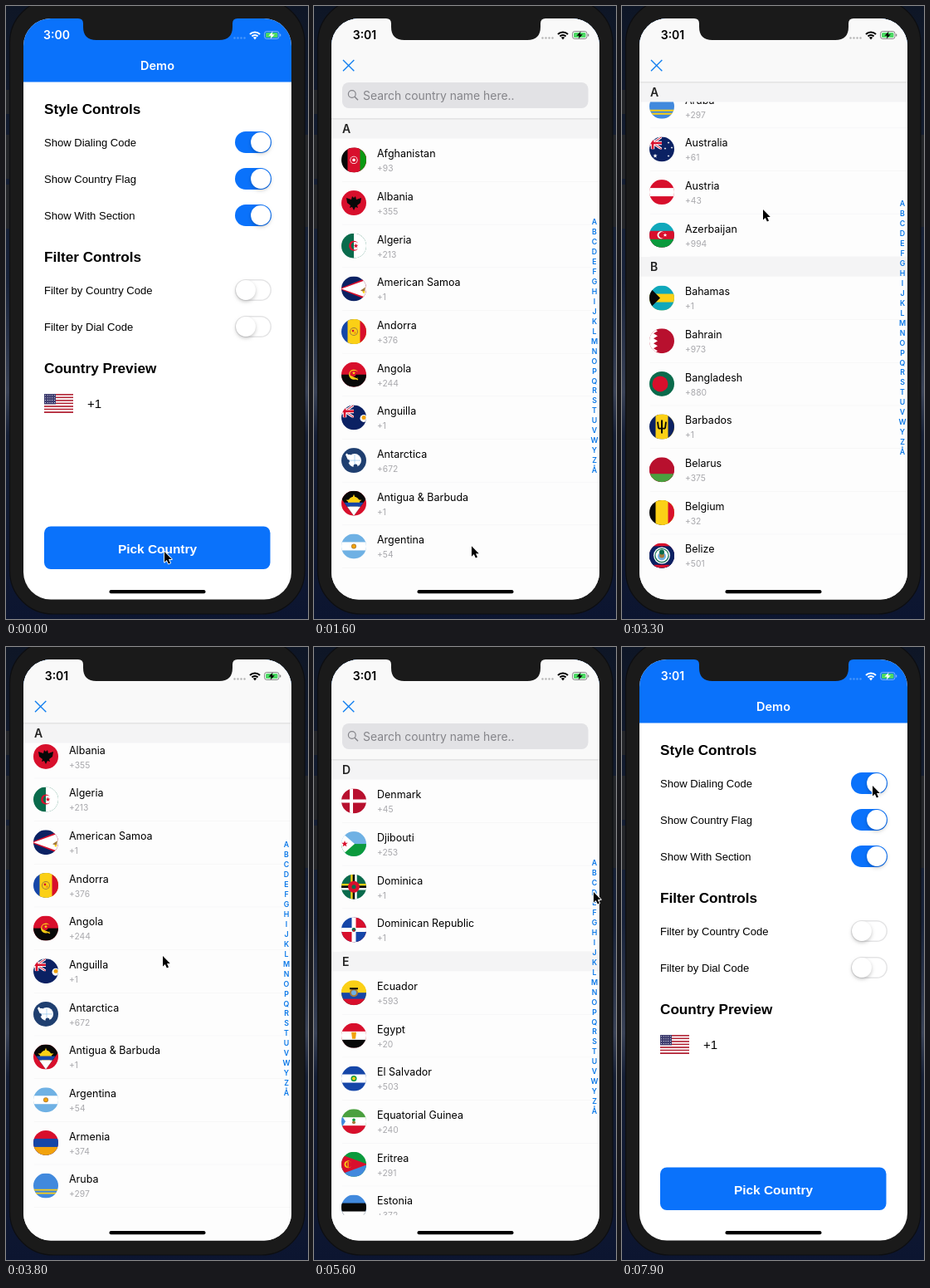
Write an HTML page with a canvas that moves like this. It is 364 by 738 pixels and loops after 8000 ms.

```html
<!DOCTYPE html>
<html lang="en">
<head>
<meta charset="utf-8">
<title>Country picker demo</title>
<style>
html, body { margin: 0; width: 100%; height: 100%; overflow: hidden; background: #111a2c; }
canvas { display: block; width: 364px; height: 738px; }
</style>
</head>
<body>
<canvas id="stage"></canvas>
<script>
const LOOP = 8000, BLUE = '#0a72fb', BEZEL = '#1a1a1a';
const UI = 'Inter, Roboto, sans-serif', HELV = '"Liberation Sans", Arial, sans-serif';
const canvas = document.getElementById('stage'), g = canvas.getContext('2d');
const dpr = window.devicePixelRatio || 1;
canvas.width = 364 * dpr;
canvas.height = 738 * dpr;

// name | dial code | flag: h/v stripes, c circle, p polygon, l line, m crescent, s star, j union jack
const COLORS = { k: '#080808', r: '#d80f2c', g: '#0a9a3c', w: '#fff', b: '#0b2163', y: '#fbd016', u: '#1546a8',
  s: '#6fb1e4', o: '#f2a20c', a: '#10a8bb', e: '#0a6b4c', n: '#a5793a', i: '#4189dd', d: '#1f3f70',
  t: '#b8102e', l: '#4aa03f', f: '#0a9a12' };
const COUNTRIES = `Afghanistan|93|vkrrf cw0,0,4.6 cr0,0,3.8 cw0,0,1.8
Albania|355|hr pk-9,-6,-3,-4,-2,-8,0,-6,2,-8,3,-4,9,-6,8,0,4,3,5,6,2,5,0,9,-2,5,-5,6,-4,3,-8,0
Algeria|213|vew mr0,0,6 sr2.5,0,3
American Samoa|1|hb pr-18,0,15,-13,15,13 pw-15,0,16,-11,16,11 pn8,2,14,-2,13,4 cy12,4,1.3
Andorra|376|vuyyr cn0,0,5 cy0,0,4 cr-1,-1,1.3 co1.5,1.5,1.5
Angola|244|hrk my0,0,6 cr-1,-1,3.6 ly-4,2,5,6,1.5 sy0,-2,2.2
Anguilla|1|hb j cw12,1,4.5 co12,0,2.5
Antarctica|672|hd cw1,0,8 pw-10,-7,-4,-7,0,2,-6,2 cd2,7,2.5 cd-7,1,2 lw-9,-8,-5,-3,2 ls-6,0,8,0,.5 ls1,-7,1,5,.5
Antigua & Barbuda|1|hr pk-22,-15,22,-15,0,15 sy0,-1,10 cy0,-1,7 pu-11.7,-1,11.7,-1,8,4,-8,4 pw-8,4,8,4,0,15
Argentina|54|hsws cn0,0,3 co0,0,2.3
Armenia|374|hruo
Aruba|297|hi ly-15,5,15,5,1.8 ly-15,9,15,9,1.8
Australia|61|hb j sw-8,8,2.8 sw8,-8,1.5 sw4,-1,1.5 sw12,-2,1.5 sw8,8,1.5
Austria|43|hrwr
Azerbaijan|994|harg mw-1,0,4.5 sw4,0,2.5
Bahamas|1|haya pk-16,-14,-2,0,-16,14
Bahrain|973|ht pw-15,-15,-10,-15,-5,-12,-10,-9,-5,-6,-10,-3,-5,0,-10,3,-5,6,-10,9,-5,12,-10,15,-15,15
Bangladesh|880|he cr-2,0,9.5
Barbados|1|vbyyb lk0,-8,0,8,2 lk-5,-6,-4,2,1.8 lk5,-6,4,2,1.8 lk-4,2,4,2,1.8
Belarus|375|httl
Belgium|32|vkyyr
Belize|501|hrbbbbbbr cw0,0,10 ce0,0,8.7 cw0,0,7.5 cs0,1,5 cn0,0,3 ce0,-4,3
Benin|229|hyr pg-15,-15,-6,-15,-6,15,-15,15
Bermuda|1|hr j cw9,1,5 cr9,1,2
Bhutan|975|ho py-15,-15,15,-15,-15,15 cw0,0,5
Bolivia|591|hryg
Bosnia|387|hu py-8,-15,12,-15,12,12
Cambodia|855|hurru pw-6,5,-6,-2,0,-6,6,-2,6,5
Cameroon|237|vgrry sy0,0,4
Canada|1|vrwwr sr0,0,7
Cape Verde|238|huuuwrwu
Cayman Islands|1|hb j cw10,2,4
Chad|235|vuyyr
Chile|56|hwr pu-15,-15,-4,-15,-4,0,-15,0 sw-8,-6,3
China|86|hr sy-7,-5,5
Christmas Island|61|hu pg-15,-15,15,-15,15,15 cy0,0,4
Colombia|57|hyyur
Comoros|269|hywru pg-15,-15,2,0,-15,15 mw-7,0,4
Costa Rica|506|huwrrwu
Croatia|385|hrwu cr0,0,5
Cuba|53|huwuwu pr-15,-15,1,0,-15,15 sw-8,0,4
Denmark|45|ht lw-3,-15,-3,15,4 lw-15,0,15,0,4
Djibouti|253|hsg pw-16,-15,1,0,-16,15 sr-11,0,4
Dominica|1|he ly-2.5,-15,-2.5,15,2.5 lk0,-15,0,15,2.5 lw2.5,-15,2.5,15,2.5 ly-15,-2.5,15,-2.5,2.5 lk-15,0,15,0,2.5 lw-15,2.5,15,2.5,2.5 cr0,0,7 ce0,0,2.5
Dominican Republic|1|vur pr-15,0,0,0,0,15,-15,15 pu0,0,15,0,15,15,0,15 lw0,-15,0,15,5 lw-15,0,15,0,5 ce0,0,2.4 cr0,1,1.2
Ecuador|593|hyyur cn0,0,5 cs0,0,3 lk-5,-5,5,-5,2
Egypt|20|hrwk po-3,-4,3,-4,2,4,-2,4
El Salvador|503|huwu cg0,0,3.5 cy0,0,2
Equatorial Guinea|240|hlwr pi-16,-9,-10,0,-16,9 cn0,1,2 cg0,-2,1.8
Eritrea|291|hgi pr-24,-15,17,0,-24,15 my-7,0,4.5 lo-7,-3,-7,4,1.5
Estonia|372|hikw
Eswatini|268|huyrryu cw0,0,5 ck0,0,3
Ethiopia|251|hgyr cu0,0,6 sy0,0,5`.split('\n').map(l => l.split('|'));

const ROW = 51.67, HEAD = 24.1, NAV = 136, BOTTOM = 684, INDEX = [...'ABCDEFGHIJKLMNOPQRSTUVWYZÅ'];
const rows = [], sections = [];
let total = 0;
for (const [name, code, flag] of COUNTRIES) {
  if (!sections.length || sections.at(-1).letter !== name[0]) {
    sections.push({ letter: name[0], top: total });
    total += HEAD;
  }
  rows.push({ name, code, flag: flag.split(' '), top: total });
  total += ROW;
  sections.at(-1).end = total;
}

// Motion: [time, values..., easing into this key]
const EASE = { lin: u => u, io: u => u * u * (3 - 2 * u), out: u => 1 - (1 - u) ** 3 };
const CURSOR = [[0, 191, 657], [1550, 191, 657], [2020, 159, 448, 'io'], [2500, 162, 276, 'io'], [2650, 170, 245, 'lin'],
  [3420, 170, 245], [3640, 189, 372, 'io'], [4250, 189, 372], [4850, 337, 260, 'io'], [5050, 337, 260],
  [5500, 337, 295, 'lin'], [5900, 337, 295], [6600, 41, 71, 'io'], [6950, 41, 71], [7900, 302, 167, 'io']];
const SCROLL = [[0, 0], [2020, 0], [2500, 172, 'io'], [2650, 203, 'lin'], [3300, 633, 'out'], [3420, 633],
  [3640, 506, 'io'], [4080, -32, 'out'], [4200, -15, 'io'], [4500, 0, 'out']];

function key(list, t, i = 1) {
  const n = list.findIndex(k => k[0] > t);
  if (n < 0) return list.at(-1)[i];
  const a = list[n - 1], b = list[n], ease = EASE[b.at(-1)] || EASE.lin;
  return a[i] + (b[i] - a[i]) * ease((t - a[0]) / (b[0] - a[0]));
}
const ramp = (t, a, b) => Math.min(1, Math.max(0, (t - a) / (b - a)));

// Drawing helpers
function rect(x, y, w, h, fill) { g.fillStyle = fill; g.fillRect(x, y, w, h); }
function round(x, y, w, h, r, fill) {
  g.beginPath(); g.roundRect(x, y, w, h, r);
  g.fillStyle = fill; g.fill();
}
function disc(x, y, r, fill) { g.beginPath(); g.arc(x, y, r, 0, 7); g.fillStyle = fill; g.fill(); }
function poly(p, fill) {
  g.beginPath();
  for (let i = 0; i < p.length; i += 2) g.lineTo(p[i], p[i + 1]);
  g.closePath(); g.fillStyle = fill; g.fill();
}
function line(x1, y1, x2, y2, w, color) {
  g.beginPath(); g.moveTo(x1, y1); g.lineTo(x2, y2);
  g.lineWidth = w; g.strokeStyle = color; g.stroke();
}
function text(s, x, y, size, color, weight = 400, family = UI, align = 'left') {
  g.font = `${weight} ${size}px ${family}`;
  g.textAlign = align;
  g.fillStyle = color;
  g.fillText(s, x, y + size * 0.36);
}
function clipped(x, y, w, h, r, draw) {
  g.save(); g.beginPath(); g.roundRect(x, y, w, h, r); g.clip();
  draw(); g.restore();
}

const SHAPES = {
  c: (c, x, y, r) => disc(x, y, r, c),
  p: (c, ...p) => poly(p, c),
  l: (c, x1, y1, x2, y2, w) => line(x1, y1, x2, y2, w, c),
  m(c, x, y, r) {
    g.beginPath();
    g.arc(x, y, r, 0.6, -0.6);
    g.arc(x + r * 0.25, y, r * 0.8, -0.75, 0.75, true);
    g.fillStyle = c; g.fill();
  },
  s(c, x, y, r) {
    const p = [];
    for (let i = 0; i < 10; i++) {
      const a = i * Math.PI / 5, q = i % 2 ? r * 0.42 : r;
      p.push(x + q * Math.sin(a), y - q * Math.cos(a));
    }
    poly(p, c);
  }
};
function jack() {
  clipped(-22, -15, 22, 15, 0, () => {
    for (const [w, c] of [[3, '#fff'], [1, COLORS.r]]) {
      line(-22, -15, 0, 0, w, c);
      line(-22, 0, 0, -15, w, c);
    }
    for (const [w, c] of [[4.5, '#fff'], [2.6, COLORS.r]]) {
      line(-11, -15, -11, 0, w, c);
      line(-22, -7.5, 0, -7.5, w, c);
    }
  });
}
function flag(tokens, x, y) {
  g.save();
  g.translate(x, y);
  clipped(-15, -15, 30, 30, 15, () => {
    for (const [cmd, ...rest] of tokens) {
      if (cmd === 'j') jack();
      else if (cmd === 'h' || cmd === 'v') rest.forEach((c, i) => {
        const a = -15 + i * 30 / rest.length, d = 15 - a;
        if (cmd === 'h') rect(-15, a, 30, d, COLORS[c]);
        else rect(a, -15, d, 30, COLORS[c]);
      });
      else SHAPES[cmd](COLORS[rest[0]], ...rest.slice(1).join('').split(',').map(Number));
    }
  });
  g.restore();
}

function phone() {
  const bg = g.createLinearGradient(0, 0, 0, 738);
  [[0, '#0e1626'], [.45, '#18233b'], [.63, '#3a4358'], [.7, '#151f36'], [1, '#0c1530']].forEach(s => bg.addColorStop(...s));
  rect(0, 0, 364, 738, bg);
  for (const [y, h] of [[101, 29], [155, 53], [215, 53]]) round(-3, y, 9, h, 2, '#24262a');
  round(359, 155, 8, 111, 2, '#24262a');
  round(4.5, -8, 355.5, 740, 52, BEZEL);
  g.strokeStyle = '#0d0e11'; g.lineWidth = 1.2; g.stroke();
}
function notch() {
  g.beginPath();
  g.moveTo(87, 14); g.lineTo(87, 15);
  g.quadraticCurveTo(93, 15, 93, 21); g.lineTo(93, 25);
  g.quadraticCurveTo(93, 41, 109, 41); g.lineTo(257, 41);
  g.quadraticCurveTo(273, 41, 273, 25); g.lineTo(273, 21);
  g.quadraticCurveTo(273, 15, 279, 15); g.lineTo(279, 14);
  g.fillStyle = BEZEL; g.fill();
}
function status(clock, dark) {
  const gray = p => { const v = Math.round(255 * (1 - p)); return `rgb(${v},${v},${v})`; };
  const c = gray(Math.min(1, dark * 2.5));
  text(clock, 61, 35, 14, gray(dark), 600, UI, 'center');
  for (let i = 0; i < 4; i++) disc(275.5 + i * 4, 38.5, 1.2, dark > .5 ? '#b5b5b5' : '#4b97fb');
  g.strokeStyle = c; g.lineWidth = 2;
  for (const r of [5, 8.5]) { g.beginPath(); g.arc(300, 40, r, -2.36, -.78); g.stroke(); }
  poly([300, 40.5, 297.8, 37.8, 300, 37, 302.2, 37.8], c);
  g.globalAlpha = .45;
  g.beginPath(); g.roundRect(311.5, 30.5, 17.5, 9, 2.8); g.lineWidth = 1; g.stroke();
  round(330, 33.5, 1.3, 3, .6, c);
  g.globalAlpha = 1;
  round(313, 32, 14.5, 6, 1.5, '#4cd964');
  poly([321.5, 30.5, 316.5, 35.7, 319.6, 35.7, 318.8, 39.5, 323.8, 34.2, 320.7, 34.2], c);
}

function toggle(y, on) {
  round(276, y - 13, 44, 26, 13, on ? BLUE : '#e4e4e5');
  if (!on) round(277.5, y - 11.5, 41, 23, 11.5, '#fff');
  g.save();
  g.shadowColor = 'rgba(0,0,0,.22)'; g.shadowBlur = 4 * dpr; g.shadowOffsetY = 2 * dpr;
  disc(on ? 307 : 289, y, 11.9, '#fff');
  g.restore();
}
function home() {
  rect(20, 14, 326, 702, '#fff');
  rect(20, 14, 326, 77.5, BLUE);
  text('Demo', 182.5, 72, 14.5, '#fff', 600, UI, 'center');
  for (const [s, y] of [['Style Controls', 123.5], ['Filter Controls', 301.5], ['Country Preview', 436]])
    text(s, 46, y, 17.15, '#000', 700, HELV);
  for (const [s, y, on] of [['Show Dialing Code', 164, 1], ['Show Country Flag', 208, 1], ['Show With Section', 252, 1],
    ['Filter by Country Code', 342, 0], ['Filter by Dial Code', 386, 0]]) {
    text(s, 46, y, 13.05, '#000', 400, HELV);
    toggle(y, on);
  }
  const h = 23 / 13;
  for (let i = 0; i < 13; i++) rect(46, 467 + i * h, 35, h, i % 2 ? '#fff' : '#b22334');
  rect(46, 467, 14, h * 7, '#3c3b6e');
  for (let i = 0; i < 20; i++) disc(47.6 + i % 5 * 2.7, 468.8 + (i / 5 | 0) * 2.9, .55, '#fff');
  text('+1', 98, 478.5, 15, '#000', 400, HELV);
  round(46, 626.5, 272.5, 51.5, 8, BLUE);
  text('Pick Country', 182.5, 653, 15.45, '#fff', 700, HELV, 'center');
}

function list(scroll, nav) {
  const base = NAV - scroll;
  clipped(20, nav, 326, BOTTOM - nav, 0, () => {
    for (const r of rows) {
      const y = base + r.top;
      if (y < nav - ROW || y > BOTTOM) continue;
      flag(r.flag, 48, y + 25.3);
      text(r.name, 76, y + 17.6, 12.5, '#000');
      text('+' + r.code, 76, y + 35.4, 10.3, '#a9a9ad');
      rect(34, y + ROW - .6, 310, .6, '#f3f3f4');
    }
    for (const s of sections) {
      const y = Math.max(base + s.top, Math.min(nav, base + s.end - HEAD));
      if (y > BOTTOM || y < nav - HEAD) continue;
      rect(20, y, 326, HEAD - .6, '#f4f4f5');
      text(s.letter, 34, y + 12.3, 14, '#222', 600);
    }
  });
  const mid = (nav + BOTTOM - 1) / 2;
  INDEX.forEach((c, i) => text(c, 338, mid + (i - 12.5) * 11.96, 8.8, '#0a78e8', 600, UI, 'center'));
}
function sheet(scroll, nav) {
  rect(20, 14, 326, 740, '#fdfdfd');
  list(scroll, nav);
  rect(20, 14, 326, nav - 14, '#f9f9f9');
  rect(20, nav - .5, 326, .8, '#cfcfd2');
  line(35, 65, 48.3, 78.3, 1.4, '#1480f0');
  line(48.3, 65, 35, 78.3, 1.4, '#1480f0');
  const h = 31 - (NAV - nav);
  if (h <= 1) return;
  clipped(34, 92, 296.5, h, Math.min(8, h / 2), () => {
    rect(34, 92, 297, h, '#e2e2e5');
    g.globalAlpha = ramp(h, 14, 31);
    const y = 92 + h / 2;
    g.beginPath(); g.arc(45.8, y - 1.5, 4.4, 0, 7);
    g.strokeStyle = '#85858a'; g.lineWidth = 1.2; g.stroke();
    line(49, y + 1.7, 53, y + 5.7, 1.4, '#85858a');
    text('Search country name here..', 59, y, 13.95, '#85858a');
    g.globalAlpha = 1;
  });
}

function cursor(x, y) {
  g.save();
  g.translate(x, y);
  g.beginPath();
  for (const p of [[0, 0], [0, 12.5], [2.8, 9.9], [4.9, 14.4], [7, 13.4], [5, 9.1], [8.8, 9.1]]) g.lineTo(...p);
  g.closePath();
  g.lineJoin = 'round'; g.lineWidth = 1.8;
  g.strokeStyle = '#fff'; g.stroke();
  g.fillStyle = '#000'; g.fill();
  g.restore();
}

function draw(t) {
  g.setTransform(dpr, 0, 0, dpr, 0, 0);
  const x = key(CURSOR, t), y = key(CURSOR, t, 2);
  const jumping = t > 5050;
  const scroll = jumping ? sections[Math.round((t < 5900 ? y - 260 : 35) / 11.96)].top : key(SCROLL, t);
  const nav = t > 4500 ? NAV : Math.min(NAV, Math.max(92, NAV - scroll));
  const shown = EASE.out(ramp(t, 905, 1500)) - EASE.out(ramp(t, 6850, 7450));
  const dark = ramp(t, 1000, 1330) - ramp(t, 6950, 7280);

  phone();
  clipped(21, 15, 323, 699.4, 33, () => {
    home();
    if (shown > 0) {
      g.save();
      g.translate(0, 699 * (1 - shown));
      sheet(scroll, nav);
      g.restore();
    }
    status(t < 1600 ? '3:00' : '3:01', dark);
    round(124.5, 703, 116, 4.3, 2.1, '#000');
  });
  notch();
  cursor(x, y);
}

function frame() {
  draw(performance.now() % LOOP);
  requestAnimationFrame(frame);
}
frame();
</script>
</body>
</html>
```
